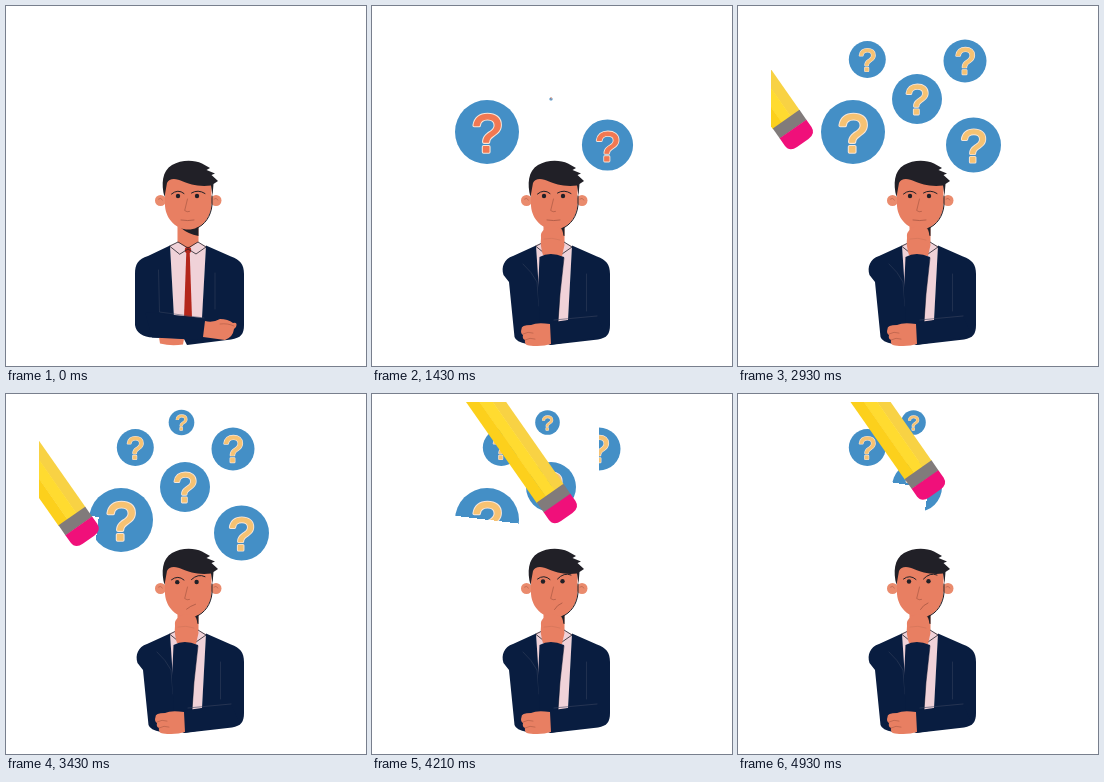
Animation of 360 by 360 pixels, one loop 5 s. Source, as an HTML page with a canvas:

```html
<!DOCTYPE html>
<html lang="en">
<head>
<meta charset="utf-8">
<title>Questions</title>
<style>
  html, body { margin: 0; width: 100%; height: 100%; overflow: hidden; background: #fff; }
  canvas { display: block; width: 360px; height: 360px; }
</style>
</head>
<body>
<canvas id="stage"></canvas>
<script>
const LOOP = 5000, SIZE = 360;
const NAVY = '#091d40', SKIN = '#e87f62', CREASE = '#a0523f', INK = '#212027',
      SHIRT = '#f0d2d8', BLUE = '#448fc6', RED = '#b3261b', SEAM = '#39445f';
const dpr = window.devicePixelRatio || 1;

const stage = document.getElementById('stage');
const layer = document.createElement('canvas');
for (const c of [stage, layer]) c.width = c.height = SIZE * dpr;
const ctx = stage.getContext('2d');
const sheet = layer.getContext('2d');

const clamp = v => Math.max(0, Math.min(1, v));
const ramp = (t, a, b) => clamp((t - a) / (b - a));
const mix = (a, b, p) => a + (b - a) * p;
const ease = p => p * p * (3 - 2 * p);
const rad = deg => deg * Math.PI / 180;

function shape(d, color) {
  ctx.fillStyle = color;
  ctx.fill(new Path2D(d));
}
function line(d, width = 0.7, color = INK) {
  ctx.lineWidth = width;
  ctx.strokeStyle = color;
  ctx.stroke(new Path2D(d));
}
function dot(c, x, y, r, color) {
  c.fillStyle = color;
  c.beginPath();
  c.arc(x, y, r, 0, 7);
  c.fill();
}

const bubble = (x, y, r, born) => ({ x, y, r, born });
const bubbles = [
  bubble(115, 126, 32, 800), bubble(235.5, 139, 27.5, 1215),
  bubble(179, 93, 25, 1416), bubble(227, 55, 21.5, 1990),
  bubble(129.3, 53.5, 18.5, 2480), bubble(175.5, 28.5, 12.3, 3100)
];

// Each wipe rubs out the half of a bubble to the right of its direction
const wipe = (target, angle, start, end) => ({ ...bubbles[target], angle, start, end });
const wipes = [
  wipe(0, 7, 3380, 3700), wipe(1, 0, 3800, 3940), wipe(1, 180, 3940, 4070),
  wipe(3, 90, 4070, 4190), wipe(0, 187, 4440, 4570), wipe(3, 270, 4640, 4800),
  wipe(2, 10, 4800, 4980)
];

// Resting points of the pencil: time and place
const stop = (t, x, y) => ({ t, x, y });
const route = [
  stop(2640, 8, 82), stop(2930, 55, 123), stop(3360, 62, 131),
  stop(3790, 209.5, 142.5), stop(3990, 252, 130), stop(4090, 218, 60),
  stop(4210, 185, 109), stop(4440, 136, 115), stop(4560, 88, 110),
  stop(4740, 222, 52), stop(4930, 187, 85.5)
];

// Grow past full size, then settle
function pop(age) {
  return age < 260 ? 1.12 * clamp(age / 260) : mix(1.12, 1, ramp(age, 260, 370));
}

function drawMark(r, color) {
  const h = r * 1.33;
  const base = h / 2 - h * 0.035;
  sheet.font = `${h * 0.93 / 0.73}px "Liberation Sans", Arial, sans-serif`;
  sheet.textAlign = 'center';
  for (const [width, tone] of [[0.085, '#f6e6da'], [0.035, color]]) {
    sheet.lineWidth = h * width;
    sheet.strokeStyle = sheet.fillStyle = tone;
    sheet.strokeText('?', 0, base);
    sheet.fillText('?', 0, base);
  }
}

function drawBubbles(t) {
  sheet.setTransform(dpr, 0, 0, dpr, 0, 0);
  sheet.clearRect(0, 0, SIZE, SIZE);
  const color = t < 2700 ? '#f17852' : '#f6c272';
  for (const { x, y, r, born } of bubbles) {
    if (t <= born) continue;
    const s = pop(t - born);
    sheet.save();
    sheet.translate(x, y);
    sheet.scale(s, s);
    dot(sheet, 0, 0, r, BLUE);
    drawMark(r, color);
    sheet.restore();
  }
  for (const { x, y, r, angle, start, end } of wipes) {
    const reach = r + 1;
    sheet.save();
    sheet.translate(x, y);
    sheet.rotate(rad(angle));
    sheet.clearRect(-reach, -0.3, 2 * reach * ramp(t, start, end), reach + 0.3);
    sheet.restore();
  }
  ctx.drawImage(layer, 0, 0, SIZE, SIZE);
}

function pencilAt(t) {
  const i = route.findIndex(s => s.t > t);
  if (i < 0) return route[route.length - 1];
  const a = route[i - 1], b = route[i];
  const p = ease(ramp(t, a.t, b.t));
  return { x: mix(a.x, b.x, p), y: mix(a.y, b.y, p) };
}

function drawPencil(t) {
  if (t < route[0].t) return;
  const { x, y } = pencilAt(t);
  const half = 16.3;
  ctx.save();
  ctx.beginPath();
  ctx.rect(33, 8, 300, 340);
  ctx.clip();
  ctx.translate(x, y);
  ctx.rotate(rad(55));
  ['#f8d244', '#ffdb30', '#fcd01c'].forEach((color, i) => {
    ctx.fillStyle = color;
    ctx.fillRect(-320, -half + i * half * 2 / 3, 309, half * 2 / 3 + 0.3);
  });
  ctx.fillStyle = '#817b7b';
  ctx.fillRect(-12, -half, 12.3, half * 2);
  shape('M0 -16.3H9Q17 -16 17 -7V7Q17 16 9 16.3H0Z', '#f0107a');
  ctx.restore();
}

function drawHead(t) {
  const mood = ease(ramp(t, 3290, 3500));
  const m = (calm, cross) => mix(calm, cross, mood);
  for (const x of [154.5, 210]) {
    dot(ctx, x, 194.5, 5.5, '#ea8b6d');
    line(`M${x - 2} 193Q${x} 191 ${x + 2} 194`, 0.5, CREASE);
  }
  shape('M159 172V200C160 214 171 223.5 182 223.5C195 223.5 204.5 213 205.5 199V172Z', SKIN);
  line('M206 190V199C205 210 199 219 190 222.5', 1);
  shape('M158.5 191C155 178 156 165 166 159C175 153.5 188 153.5 196 157.5L204 162L200.5 164L209 167.5L205.5 169L212 175L207.5 178L206.5 190L205 179.5C192 181 183 178 177 175.5C170 172 163 172 161 177Z', INK);

  dot(ctx, m(172, 171), m(190, 187.5), 2.2, INK);
  dot(ctx, m(191, 190.5), m(190, 187.3), 2.2, INK);
  line(`M165.5 ${m(188, 185)}Q172 ${m(182.5, 180)} 178 ${m(187.5, 185.5)}`, 1);
  line(`M185.5 ${m(187, 185)}Q192 ${m(183, 178)} 199 ${m(187.5, 181)}`, 1);
  line('M181.5 193L178.7 204.5Q181 206.5 183.5 205.5', 0.6, CREASE);
  line(`M${m(175, 182.5)} ${m(214, 215.5)}Q${m(182, 185)} ${m(215.2, 211)} ${m(188, 190)} ${m(214, 209)}`, 0.7, CREASE);
}

function drawNeck() {
  shape('M171.5 216H192.5V240L182 245L171.5 240Z', SKIN);
  shape('M175 222Q185 225 192.5 219V230Q182 228 175 222Z', INK);
}

function drawShirt() {
  shape('M164 239L172 236L182 243L192 236L200 240L196 316H168Z', SHIRT);
  shape('M180.3 246H183.7L186 312H178Z', RED);
  dot(ctx, 182, 244, 3.2, RED);
  line('M164 240L172 236L182 242L192 236L200 241L190 248L182 243L174 248Z', 0.8);
}

function drawCrossed() {
  shape('M164 239.5L142 250C132 253 129 258 129 268V319C130 327 137 331 147 331.5L178 333L181 339L225 333.5C235 332 238 328 238 319V268C238 258 234 254 225 250.5L200 239.5L196 312H168Z', NAVY);
  shape('M153 331L178 333L177 338.5Q165 340.5 154 337.5Z', SKIN);
  shape('M139 306L198 312L196 334L146 331.5Z', NAVY);
  shape('M199 315Q207 317 214 313Q222 313 227 317Q232 316 230 321L228 323Q227 331 219 334L197 331Z', SKIN);
  line('M214 318Q222 317 228 320', 0.5, CREASE);
  line('M152.5 264L153.5 306L198 312M209 267V303', 0.5, SEAM);
}

// The forearm swings up from the lap to the chin
function drawForearm(p) {
  ctx.save();
  ctx.translate(178, 318);
  ctx.rotate((1 - p) * 1.45);
  ctx.scale(1, mix(0.6, 1, p));
  ctx.translate(-178, -318);
  shape('M171 249Q168 240 169 232Q168 226 173 223Q178 219 184 221Q190 220 191 227L192.5 239L190 250Z', SKIN);
  line('M172 233Q180 231 188 234', 0.4, '#c26c55');
  shape('M167.5 251Q178 245 192 251L188 288L186 318H168L166 285Z', NAVY);
  line('M192 252L188 288L186 316', 0.5, '#000a20');
  ctx.restore();
}

function drawThinking(p) {
  shape('M164 239.5L141 250C132 253 129 261 131.5 269L137 276L142.5 331Q144 336 155 338H176L178 339L226 333.5C235 332 238 328 238 319V268C238 258 234 254 225 250.5L200 239.5L196 314L187 318H170L166 270Z', NAVY);
  line('M151 258Q160 266 165 276L167 300M214.5 268V305', 0.5, SEAM);
  drawForearm(p);
  shape('M174 317L225 310L234 330L178 339Z', NAVY);
  line('M182 314L225 310', 0.6, SEAM);
  shape('M178 318Q165 316 159 319Q149 319 149.5 323Q148 327 151 329Q150 333 153 334Q152 339 157 339.5Q170 341 179 338Z', SKIN);
  line('M151 328Q156 325 161 327M153 334Q158 331 163 333', 0.5, CREASE);
}

function draw(t) {
  ctx.setTransform(dpr, 0, 0, dpr, 0, 0);
  ctx.fillStyle = '#fff';
  ctx.fillRect(0, 0, SIZE, SIZE);
  for (const c of [ctx, sheet]) c.lineCap = c.lineJoin = 'round';
  drawBubbles(t);
  drawNeck();
  drawShirt();
  drawHead(t);
  const p = ease(ramp(t, 430, 930));
  if (p > 0) drawThinking(p);
  else drawCrossed();
  drawPencil(t);
}

const start = performance.now();
function tick() {
  draw((performance.now() - start) % LOOP);
  requestAnimationFrame(tick);
}
tick();
</script>
</body>
</html>
```
